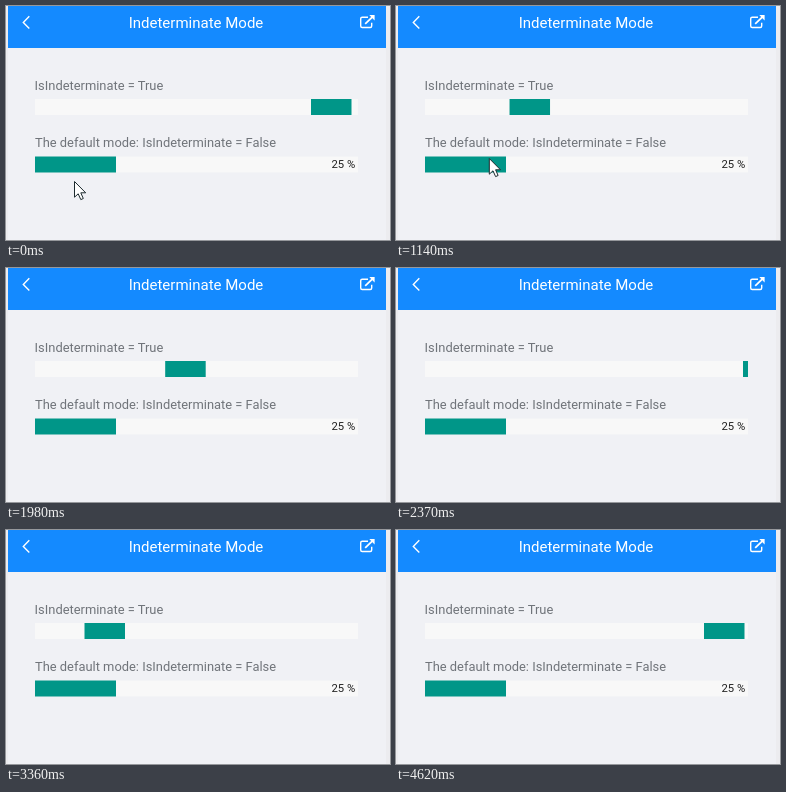
Animation of 384 by 234 pixels, one loop 4.65 s. Source, as an HTML page:

```html
<!DOCTYPE html>
<html lang="en">
<head>
<meta charset="utf-8">
<title>Indeterminate Mode</title>
<style>
  html, body { margin: 0; width: 100%; height: 100%; overflow: hidden; background: #ececef; }
  svg { display: block; width: 384px; height: 234px; font-family: Roboto, sans-serif; }
  .label { font-size: 12.9px; fill: #70747a; }
  .track { fill: #f8f8f8; }
  .fill { fill: #009688; }
  .icon { fill: none; stroke: #fff; stroke-width: 1.4; }
</style>
</head>
<body>
<svg viewBox="0 0 384 234">
  <rect x="2" width="378" height="234" fill="#f0f1f5"/>
  <rect x="2" width="378" height="42" fill="#148aff"/>
  <text x="190" y="22.3" font-size="15" fill="#fff" text-anchor="middle">Indeterminate Mode</text>
  <path class="icon" d="M23.3 10.3 17.3 16.4 23.3 22.5"/>
  <path class="icon" d="M362 11.2H356.2Q354.7 11.2 354.7 12.7V20Q354.7 21.5 356.2 21.5H364.2Q365.7 21.5 365.7 20V16.8"/>
  <path class="icon" style="stroke-width:1.8" d="M359.2 17.8 366.5 10.8"/>
  <path fill="#fff" d="M363.3 9H368.6V14.4Z"/>

  <text class="label" x="28.6" y="83.5">IsIndeterminate = True</text>
  <svg x="29" y="93" width="323" height="16">
    <rect class="track" width="323" height="16"/>
    <rect class="fill" id="segment" width="40.5" height="16"/>
  </svg>

  <text class="label" x="29" y="141">The default mode: IsIndeterminate = False</text>
  <rect class="track" x="29" y="150.5" width="323" height="16"/>
  <rect class="fill" x="29" y="150.5" width="81" height="16"/>
  <text x="349.3" y="162.3" font-size="11.3" fill="#222" text-anchor="end">25 %</text>

  <path id="cursor" d="M.5.5V16.2L4.2 12.8 6.8 18.6 9.3 17.5 6.8 11.8H11.7Z" fill="#fff" stroke="#1c2a2e"/>
</svg>
<script>
  const LOOP = 4650, STEP = 30, SWEEP = 363, SEGMENT = 40;

  // Distance travelled by the segment over successive sweeps: [ms, px]
  const travel = [[0, 316], [720, 644], [1080, 821], [1530, 1042.5], [2370, 1447],
    [3300, 1880], [3360, 1904.5], [3900, 2161], [4410, 2391], [4620, 2497], [4650, 2511]];

  // Pointer tip: [ms, x, y]
  const pointer = [[0, 68, 175], [200, 68, 175], [540, 65, 153], [720, 61, 120],
    [1080, 88, 148], [1530, 124, 178], [1620, 130, 236]];

  function sample(keys, t, axis = 1) {
    const i = keys.findIndex(key => key[0] > t);
    if (i < 0) return keys[keys.length - 1][axis];
    const a = keys[i - 1], b = keys[i];
    return a[axis] + (b[axis] - a[axis]) * (t - a[0]) / (b[0] - a[0]);
  }

  const segment = document.getElementById("segment");
  const cursor = document.getElementById("cursor");
  const start = performance.now();

  function draw() {
    const elapsed = (performance.now() - start) % LOOP;
    const t = Math.floor(elapsed / STEP) * STEP;
    segment.setAttribute("x", sample(travel, t) % SWEEP - SEGMENT);
    cursor.setAttribute("transform", `translate(${sample(pointer, t)} ${sample(pointer, t, 2)})`);
    requestAnimationFrame(draw);
  }
  draw();
</script>
</body>
</html>
```
